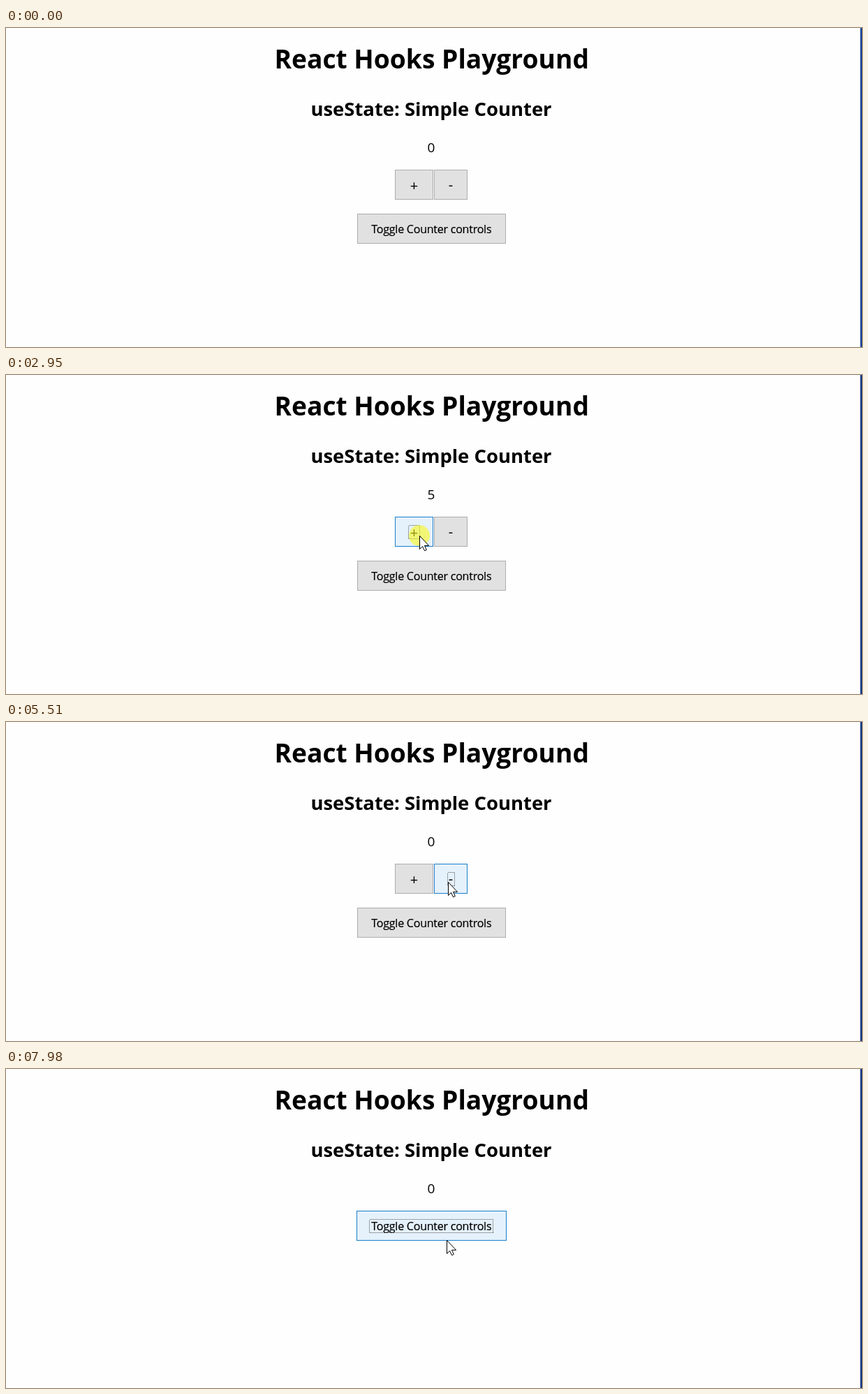
Animation of 1226x457 px, one loop 8 s. Source, as an HTML page:

```html
<!DOCTYPE html>
<html lang="en">
<head>
<meta charset="utf-8">
<title>React Hooks Playground</title>
<style>
  html, body { margin: 0; width: 100%; height: 100%; overflow: hidden; background: #fefefe; }
  svg { display: block; width: 1226px; height: 457px; font-family: "Open Sans", "Noto Sans", sans-serif; }
  text { text-anchor: middle; }
  .title { font-weight: 700; }
  .face, .dots { shape-rendering: crispEdges; }
  .label { font-size: 16px; letter-spacing: -.22px; stroke: #000; stroke-width: .2px; }
  .sign { font-size: 20px; }
  .dots { fill: none; stroke: #555; stroke-dasharray: 1 1; }
</style>
</head>
<body>
<svg viewBox="0 0 1226 457">
  <rect id="edge" x="1223.5" width="2.5" height="457"/>
  <text class="title" x="609.7" y="58" font-size="37.2">React Hooks Playground</text>
  <text class="title" x="609" y="125.5" font-size="27.45">useState: Simple Counter</text>
  <text id="count" x="609" y="178" font-size="19">0</text>
  <g id="plus"><rect class="face"/><text class="sign" x="584.5" y="232.5">+</text><rect class="dots" x="576.5" y="215.5" width="16" height="19"/></g>
  <g id="minus"><rect class="face"/><text class="sign" x="637" y="232">-</text><rect class="dots" x="632.5" y="215.5" width="10" height="19"/></g>
  <g id="toggle"><rect class="face"/><text class="label" x="609.3" y="294">Toggle Counter controls</text><rect class="dots" x="520.5" y="278.5" width="177" height="19"/></g>
  <g id="pointer">
    <circle id="halo" r="15" fill="#fafa14" fill-opacity=".58"/>
    <path d="M.5.5V19.5L4.6 15.5L7.5 21.8L10.3 20.6L7.5 14.4H13.6Z" fill="#fff" stroke="#000"/>
  </g>
</svg>
<script>
const LOOP = 8000, STEP = 80;
const HEIGHT = 43, RISE = 63;
const $ = id => document.getElementById(id);

// The pointer rests, then glides for `span` ms to reach x, y at `at`.
const glide = (at, span, x, y) => ({ at, span, x, y });
const path = [
  glide(370, 0, 1024, 412), glide(610, 240, 612, 224),
  glide(850, 0, 604, 225), glide(930, 0, 611, 225), glide(1260, 160, 592, 230),
  glide(3500, 0, 611, 232), glide(3750, 0, 631, 228), glide(3820, 0, 633, 229),
  glide(5910, 160, 630, 346), glide(6060, 160, 626, 283),
  glide(7020, 480, 636, 142), glide(7340, 320, 633, 225),
  glide(7670, 320, 637, 123), glide(7980, 320, 631, 245)
];

const burst = (name, start, gap, count, hold = STEP) =>
  Array.from({ length: count }, (_, i) => ({ name, down: start + i * gap, up: start + i * gap + hold }));
const clicks = [
  ...burst("plus", 1670, 280, 3),
  ...burst("plus", 2470, 220, 5),
  ...burst("minus", 3990, 190, 8),
  ...burst("toggle", 6290, 0, 1, 170)
];

const buttons = {
  plus: { x: 557, y: 203, w: 55 },
  minus: { x: 613, y: 203, w: 48 },
  toggle: { x: 503, y: 266, w: 213, grow: 1 }
};

function attrs(el, values) {
  for (const key in values) el.setAttribute(key, values[key]);
}

function show(el, on) {
  el.style.display = on ? "" : "none";
}

function pointerAt(t) {
  const i = path.findLastIndex(p => p.at <= t);
  if (i < 0) return null;
  const from = path[i], to = path[i + 1];
  if (!to || t < to.at - to.span) return from;
  const u = Math.floor((t - to.at + to.span) / STEP) * STEP / to.span;
  const k = u * u * (3 - 2 * u);
  return { x: from.x + (to.x - from.x) * k, y: from.y + (to.y - from.y) * k };
}

function drawButton(name, tip, pressed, focused, rise) {
  const { x, y, w, grow = 0 } = buttons[name];
  const top = y - rise;
  const hover = tip && tip.x >= x && tip.x < x + w && tip.y >= top && tip.y < top + HEIGHT;
  const line = focused && !hover && !pressed ? 2 : 1;
  const out = hover || focused ? grow : 0;
  const g = $(name);
  attrs(g, { transform: `translate(0 ${-rise})` });
  attrs(g.querySelector(".face"), {
    x: x - out + line / 2, y: y + line / 2,
    width: w + 2 * out - line, height: HEIGHT - line,
    fill: pressed ? "#cce4f7" : hover ? "#e5f1fb" : "#e1e1e1",
    stroke: pressed ? "#005499" : hover ? "#1a7fcb" : focused ? "#0078d7" : "#adadad",
    "stroke-width": line
  });
  show(g.querySelector(".dots"), focused);
}

function draw(t) {
  const tip = pointerAt(t);
  const last = clicks.findLast(c => c.down <= t);
  const done = name => clicks.filter(c => c.name === name && c.up <= t).length;
  const hidden = done("toggle") % 2 === 1;
  const halo = !!last && t < last.down + STEP;

  $("count").textContent = done("plus") - done("minus");
  for (const name in buttons) {
    const focused = !!last && last.name === name;
    const pressed = focused && !halo && t < last.up;
    drawButton(name, tip, pressed, focused, name === "toggle" && hidden ? RISE : 0);
  }
  show($("plus"), !hidden);
  show($("minus"), !hidden);
  show($("pointer"), tip);
  show($("halo"), halo);
  if (tip) attrs($("pointer"), { transform: `translate(${Math.round(tip.x)} ${Math.round(tip.y)})` });
  attrs($("edge"), { fill: t < 1670 ? "#17418f" : "#12357f" });
}

const start = performance.now();
function tick() {
  draw((performance.now() - start) % LOOP);
  requestAnimationFrame(tick);
}
tick();
</script>
</body>
</html>
```
